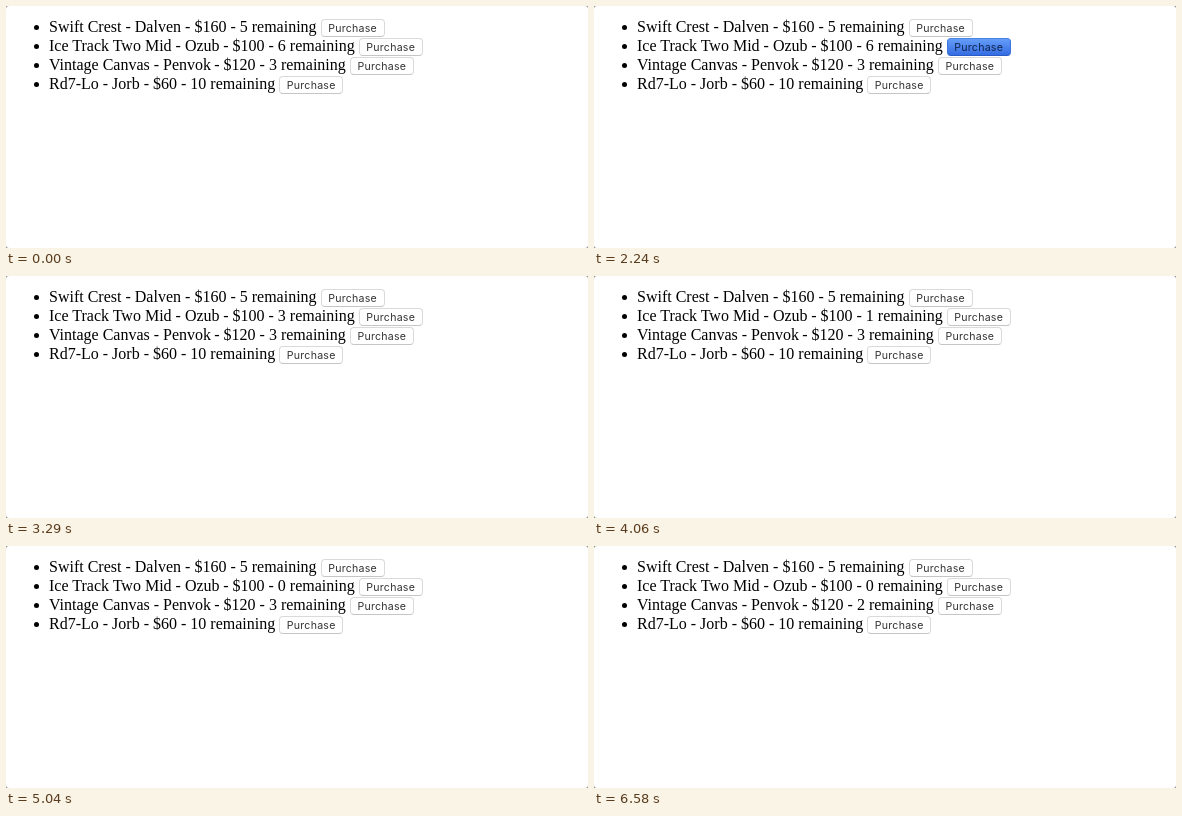
Animation of 582x242 px, one loop 8 s. Source, as an HTML page:

```html
<!DOCTYPE html>
<html lang="en">
<head>
<meta charset="utf-8">
<title>Shoe stock</title>
<style>
  html, body { margin: 0; width: 100%; height: 100%; overflow: hidden; }
  html { background: #8c8c8c; }
  body { position: relative; background: #fff; border-radius: 3px; }
  ul { margin: 0; padding: 0; list-style: none; }
  li {
    position: absolute; left: 43px;
    display: flex; justify-content: space-between;
    font: 16px/17px "Liberation Serif", Times, serif;
    color: #000; white-space: pre;
  }
  li::before {
    content: ""; position: absolute; left: -15px; top: 7px;
    width: 5px; height: 5px; border-radius: 50%; background: #000;
  }
  .buy {
    position: absolute; left: calc(100% + 4px); top: 1px;
    box-sizing: border-box; width: 64px; height: 18px;
    border: 1px solid #dadada; border-bottom-color: #c6c6c6; border-radius: 4px;
    background: #fff;
    font: 10.6px/17px Inter, "Liberation Sans", sans-serif;
    letter-spacing: 0.24px;
    color: #333; text-align: center;
  }
  .down {
    border-color: #4a83e6 #3d74dc #2a5cc8;
    background: linear-gradient(#649df8, #356ce2);
    color: #10254f;
  }
</style>
</head>
<body>
<ul id="list"></ul>
<script>
  const LOOP = 8000;

  // end: x where the row's text stops; clicks: [press, release] in ms
  const rows = [
    { name: "Swift Crest - Dalven", price: 160, stock: 5, end: 310.6, clicks: [] },
    { name: "Ice Track Two Mid - Ozub", price: 100, stock: 6, end: 348.7, clicks: [
      [2240, 2380], [2730, 2870], [3150, 3290], [3570, 3640],
      [3920, 4060], [4410, 4480], [4900, 5040], [5390, 5530]] },
    { name: "Vintage Canvas - Penvok", price: 120, stock: 3, end: 339.8, clicks: [[6510, 6580]] },
    { name: "Rd7-Lo - Jorb", price: 60, stock: 10, end: 269.2, clicks: [] }
  ];

  const list = document.getElementById("list");

  function add(parent, tag, text, cls = "") {
    const el = document.createElement(tag);
    el.textContent = text;
    el.className = cls;
    parent.append(el);
    return el;
  }

  rows.forEach((row, i) => {
    const li = add(list, "li", "");
    li.style.top = 12 + 19 * i + "px";
    li.style.width = row.end - 43 + "px";
    add(li, "span", row.name);
    row.tail = add(li, "span", "");
    row.buy = add(li, "span", "Purchase", "buy");
  });

  function draw(t) {
    for (const row of rows) {
      const sold = row.clicks.filter(([, up]) => t >= up).length;
      const text = `- $${row.price} - ${Math.max(0, row.stock - sold)} remaining`;
      if (row.tail.textContent !== text) row.tail.textContent = text;
      row.buy.classList.toggle("down", row.clicks.some(([down, up]) => t >= down && t < up));
    }
  }

  const start = performance.now();
  function tick() {
    draw((performance.now() - start) % LOOP);
    requestAnimationFrame(tick);
  }
  draw(0);
  requestAnimationFrame(tick);
</script>
</body>
</html>
```
